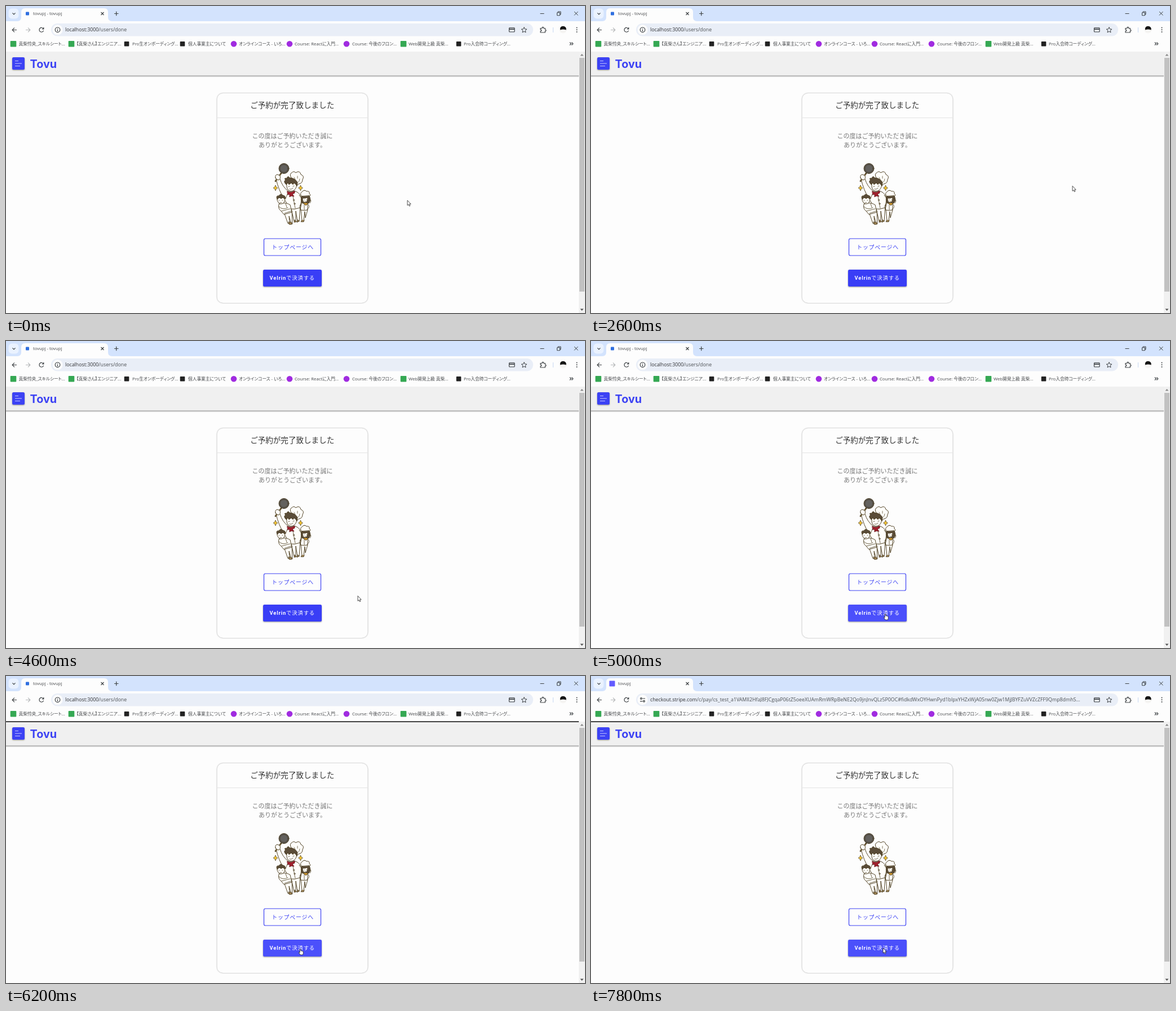
Animation, 1027 px wide and 545 px high, one loop 8 s. Source, as an HTML page:

```html
<!DOCTYPE html>
<html lang="ja">
<head>
<meta charset="utf-8">
<title>tovupj</title>
<style>
html, body { margin: 0; width: 100%; height: 100%; overflow: hidden; background: #fdfdfd; }
svg { position: absolute; left: 0; top: 0; }
.ui { font-family: "Open Sans", "Noto Sans CJK JP", sans-serif; font-feature-settings: "palt"; fill: #46484b; }
.ja { font-family: "Noto Sans CJK JP", sans-serif; font-weight: 300; text-anchor: middle; }
.btn { font-family: Roboto, "Noto Sans CJK JP", sans-serif; letter-spacing: .84px; }
.icon { fill: none; stroke: #3c4043; stroke-width: 1.2; }
.art { stroke: #4a3b1e; stroke-width: .95; fill: #fffefa; stroke-linejoin: round; stroke-linecap: round; }
.hair { fill: #5a4c38; }
.line { fill: none; }
#url { position: absolute; left: 105px; top: 34px; width: 790px; height: 17px; line-height: 17px;
  font-size: 8.8px; color: #4c5054; white-space: nowrap; overflow: hidden; }
#url b { font-weight: 400; color: #303134; }
</style>
</head>
<body>
<svg width="1027" height="545" viewBox="0 0 1027 545">
  <defs>
    <clipPath id="btnClip"><rect x="456" y="468" width="104" height="30" rx="2.500"/></clipPath>
    <clipPath id="faceClip"><circle cx="988" cy="42" r="6.500"/></clipPath>
    <clipPath id="pageClip"><rect y="81" width="1016" height="464"/></clipPath>
    <path id="star4" d="M0-5Q.7-.8 4 0Q.7.8 0 5Q-.7.8-4 0Q-.7-.8 0-5Z" fill="#f2c230" stroke="#4a3a18" stroke-width=".7"/>
  </defs>

  <!-- browser window -->
  <rect width="1027" height="34" fill="#d3e3fd"/>
  <rect y="27" width="1027" height="54" fill="#fdfdfd"/>
  <path d="M20 27Q27 27 27 20V11Q27 4 34 4H174Q181 4 181 11V20Q181 27 188 27Z" fill="#fdfdfd"/>
  <rect x="4.500" y="4.500" width="18" height="18" rx="6" fill="#eaf2ff"/>
  <g class="icon">
    <path d="M11.500 12.300L14 14.800L16.500 12.300"/>
    <path d="M168.500 11L173.500 16M173.500 11L168.500 16"/>
    <path d="M192 13.500H199.500M195.700 9.700V17.300"/>
    <path d="M947.500 13.500H954.500M977.500 11.800H982.500V16.800H977.500ZM979 11.500V10H984V15H982.800M1008 10L1014.500 16.500M1014.500 10L1008 16.500" stroke-width="1"/>
    <path d="M19 42.500H11.500M15 38.700L11.200 42.500L15 46.300"/>
    <path d="M35 42.500H42.500M39 38.700L42.800 42.500L39 46.300" stroke="#b4b6b8"/>
    <path d="M66.300 40.400A3.900 3.900 0 1 0 66.600 43.600M66.800 38V41H63.800"/>
  </g>
  <rect x="80" y="31" width="855" height="22.500" rx="11.200" fill="#e9eef7"/>
  <circle cx="91.500" cy="42.300" r="9" fill="#fdfdfd"/>
  <g id="info" class="icon"><circle cx="91.500" cy="42.300" r="4.300"/><path d="M91.500 41.700V45M91.500 39.700V40.800"/></g>
  <g id="tune" class="icon"><circle cx="89" cy="40" r="1.400"/><circle cx="94" cy="44.800" r="1.400"/><path d="M91.500 40H96M87 44.800H91.500"/></g>
  <g class="icon">
    <rect x="892.500" y="38.500" width="9.500" height="7.500" rx="1"/><path d="M892.500 41H902" stroke-width="1.800"/>
    <path d="M919 37.600L920.400 40.900L923.900 41.200L921.200 43.500L922 47L919 45.100L916 47L916.800 43.500L914.100 41.200L917.600 40.900Z" stroke-width="1"/>
    <path d="M948 39.500H951Q951 37.300 952.300 37.300Q953.600 37.300 953.600 39.500H956.300V42Q958 42 958 43.300Q958 44.600 956.300 44.600V47H948V44.800Q949.900 44.600 949.900 43.300Q949.900 42 948 41.900Z"/>
    <path d="M970.500 38V47" stroke="#cfdcf3"/>
  </g>
  <g clip-path="url(#faceClip)"><rect x="980" y="34" width="16" height="16" fill="#f6f5f3"/><path d="M983 42.500Q982 36 988 35.500Q994.500 36 993.500 42.500Q988 40.500 983 42.500Z" fill="#151515"/></g>
  <g fill="#3c4043"><circle cx="1012.500" cy="38.500" r="1"/><circle cx="1012.500" cy="42.200" r="1"/><circle cx="1012.500" cy="45.900" r="1"/></g>
  <rect id="fav" y="9" height="9" rx="1"/>
  <text id="tab" class="ui" x="48" y="16.400" font-size="7.700"></text>
  <g id="marks" class="ui" font-size="7.700"></g>
  <path class="icon" d="M1000 64.500L1002.500 67L1000 69.500M1003.300 64.500L1005.800 67L1003.300 69.500"/>

  <!-- page -->
  <g clip-path="url(#pageClip)">
    <rect y="81" width="1016" height="464" fill="#fdfdfd"/>
    <rect x="-5" y="81" width="1026" height="42.500" fill="#f0f0f0" style="filter:drop-shadow(0 1px 1.300px #0008)"/>
  </g>
  <rect id="bar" y="80.300" width="1016" height="1.700" fill="#222"/>
  <rect x="11" y="91" width="22" height="22" rx="2.500" fill="#3c42f4" style="filter:drop-shadow(0 1px 1px #0006)"/>
  <path d="M16 97.500H22M16 102H28M16 106.500H25" stroke="#c9cbff" stroke-width="1"/>
  <text x="42.500" y="110" font-family="Inter, sans-serif" font-size="19.800" font-weight="700" fill="#3c42f4">Tovu</text>

  <rect x="374.500" y="155" width="267" height="372" rx="10.500" fill="#fdfdfd" style="filter:drop-shadow(0 .8px .9px #0006)"/>
  <path d="M374.500 198.500H641.500" stroke="#e4e4e4"/>
  <g class="ja">
    <text x="507.700" y="181.200" font-size="13.550" fill="#333">ご予約が完了致しました</text>
    <g font-size="11" fill="#777">
      <text x="508" y="234.500">この度はご予約いただき誠に</text>
      <text x="508" y="250.700">ありがとうございます。</text>
    </g>
  </g>

  <g class="art">
    <!-- tall chef -->
    <path d="M505 356L511 382L514 383L514 364L517 382L520 382L522 355Z"/>
    <path d="M479 307Q483 326 494 344Q500 351 502 360Q512 362 522 358L524 343Q523 333 514 329H501Q490 321 486 307Z"/>
    <path class="line" d="M496 342L499 334M520 336Q527 342 524 350M509 338L513 359" stroke-width=".8"/>
    <path d="M506 305Q502 298 507 296Q510 292 514 296Q521 291 523 299Q530 302 526 308Q526 315 519 316L515 319L504 309Z"/>
    <path class="line" d="M511 304L513 308M517 302V306M518 313Q521 311 521 307" stroke-width=".7"/>
    <path d="M498 313Q497 322 500 326Q505 331 511 327Q516 323 516 314Q507 308 498 313Z"/>
    <path class="hair" d="M497 317Q491 311 496 309Q492 305 498 306Q500 300 503 305Q512 305 517 313L516 320Q514 316 511 314L509 317L506 314L502 317L500 314Z"/>
    <path class="line" d="M501 320.500L503 320M509 320L511 319.500M503 325Q507 326 509 323" stroke-width=".8"/>
    <path d="M499 329Q505 333 512 328L512 332L508 334L511 338L506 337L503 339L503 334L500 335Z" fill="#a3202c" stroke="#63141b"/>
    <g class="line" stroke-width=".7"><circle cx="510.500" cy="344.500" r="1.200"/><circle cx="512" cy="351" r="1.200"/></g>
    <path d="M512 380L511 384L515 383ZM517 380L516 384L520 382Z" fill="#a28656"/>
    <!-- pan -->
    <path d="M488 297L478 311" stroke="#4c3b1d" stroke-width="2.600"/>
    <path d="M487 299L479 310" stroke="#a89256" stroke-width="1"/>
    <circle cx="493" cy="288.500" r="9" fill="#555350"/><circle cx="493" cy="288.500" r="6.800" fill="#63615e" stroke-width=".5"/>
    <path d="M478 305Q477 300 481 299L486 301Q488 306 484 309Q480 309 478 305Z"/>
    <!-- left chef -->
    <path d="M493 366L500 386L503 387L502 373L506 386H508L507 363Z"/>
    <path d="M484 352Q482 360 488 364L493 370L507 366L504 353Q498 349 490 350Z"/>
    <path class="line" d="M484 356Q490 363 500 358M489 364L504 360M496 351L498 357M494 368L506 364" stroke-width=".8"/>
    <path d="M481 341Q480 346 484 350Q489 353 493 349Q496 345 494 340Z"/>
    <path class="hair" d="M481 343Q478 336 484 337Q487 332 491 336Q497 337 495 343L491 340L488 342L485 340Z"/>
    <path class="line" d="M484 345H485M490 345H491M486 349H489" stroke-width=".8"/>
    <path d="M501 384L503 388L508 387L506 384Z" fill="#a28656"/>
    <!-- right chef -->
    <path d="M523 360L525 381L528 381L530 365L531 376L535 362Z"/>
    <path d="M524 350L522 362Q529 364 535 362V350Z"/>
    <path class="line" d="M535 351Q541 357 534 361M524 351Q518 355 523 361M539 350Q543 345 539 343M529 352V362" stroke-width=".8"/>
    <path d="M525 338Q520 333 525 330Q529 325 533 329Q539 328 538 333Q542 336 537 339Z"/>
    <path class="hair" d="M524 338Q522 347 526 350H537Q542 345 538 337Z"/>
    <path d="M526 341Q526 349 531 349Q535 348 535 340Q530 342 526 341Z"/>
    <path class="line" d="M529 344H529.500M533 344H533.500M530 347H532" stroke-width=".8"/>
    <path d="M527 350L532 354L536 350" fill="#d39a2e"/>
    <path d="M525 380L523 383H528L529 380" fill="#a28656"/>
  </g>
  <use href="#star4" x="478" y="323"/><use href="#star4" x="522.500" y="323"/>

  <rect x="457.500" y="413" width="101" height="30" rx="2.500" fill="#fdfdfd" stroke="#3c42f4" stroke-width="1.200"/>
  <text class="ja btn" x="508.600" y="431.500" font-size="9.900" style="font-weight:500" fill="#3c42f4">トップページへ</text>
  <rect id="pay" x="456" y="468" width="104" height="30" rx="2.500"/>
  <g clip-path="url(#btnClip)"><circle id="ripple" cy="483" fill="#fff"/></g>
  <text class="btn" x="467.500" y="486.200" font-size="9.360" fill="#fff"><tspan font-weight="700">Velrin</tspan><tspan font-weight="400">で決済する</tspan></text>

  <!-- scrollbar -->
  <rect x="1016" y="81" width="11" height="464" fill="#f1f1f1"/>
  <rect x="1017" y="92" width="9" height="415" fill="#c1c1c1"/>
  <path d="M1018.500 88.500L1021.500 85L1024.500 88.500Z" fill="#8a8a8a"/><path d="M1018.500 537.500L1021.500 541L1024.500 537.500Z" fill="#555"/>

  <g id="cursor" fill="#fff" stroke="#222" stroke-width=".8" stroke-linejoin="round">
    <path id="arrow" d="M0 0V9L2 7.300L3.400 10.300L4.900 9.600L3.500 6.600H6.200Z"/>
    <path id="hand" d="M-.8 5.500V1Q0-.5.9 1V4Q2 3.300 2.500 4.300Q3.500 3.700 4 4.700Q5.200 4.400 5.200 5.700V8.500Q5 10 4.200 11H.2L-2.700 7Q-2.700 5.500-.8 7Z"/>
  </g>
</svg>
<div id="url" class="ui"></div>

<script>
const $ = id => document.getElementById(id);
const show = (id, on) => $(id).style.display = on ? "" : "none";

const GREEN = "#35a853", BLACK = "#222", PURPLE = "#a02be0";
const bookmarks = [
  [13, 22.5, GREEN, "真柴怜央_スキルシート..."],
  [116, 125, GREEN, "【真柴さん】エンジニア..."],
  [214, 224, BLACK, "Pro生オンボーディング..."],
  [313, 323, BLACK, "個人事業主について"],
  [404, 413, PURPLE, "オンラインコース - いろ..."],
  [503, 512, PURPLE, "Course: Reactに入門..."],
  [604, 614, PURPLE, "Course: 今後のフロン..."],
  [705, 714, GREEN, "Web開発上級 真柴..."],
  [803, 812, BLACK, "Pro入会時コーディング..."]
];
$("marks").innerHTML = bookmarks.map(([x, textX, color, label]) => {
  const r = color === BLACK ? 4.3 : 5.3;
  return `<rect x="${x - r}" y="${67.3 - r}" width="${2 * r}" height="${2 * r}" rx="${color === PURPLE ? r : 1}" fill="${color}"/>
    <text x="${textX}" y="70.3">${label}</text>`;
}).join("");

const pages = [
  { tab: "tovupj - tovupj", icon: [35, 6, "#2f6fe0"], url: "<b>localhost:3000</b>/users/done" },
  { tab: "tovupj", icon: [32.5, 10, "#635bff"], url: "<b>checkout.stripe.com</b>/c/pay/cs_test_a1VAMlI2HfaJ8FJCgqaP06tZ5oeeXUAmRmWRpBeNE2Qo9jnJnvQLz5P0OC#fidkdWxOYHwnPyd1blpxYHZxWjA0Snw0Zjw1MjJBYFZuVVZcZFF9Qmp8dmhS..." }
];

// pointer path: time, x, y
const path = [[0, 712, 345], [1200, 956, 231], [2200, 956, 231], [3000, 752, 408], [3200, 752, 408],
  [3600, 726, 421], [4200, 726, 421], [5000, 522, 484], [7000, 522, 484], [7200, 518, 483], [8000, 518, 483]];

function pointer(t) {
  const i = path.findIndex(k => k[0] > t);
  const [t0, x0, y0] = path[i - 1], [t1, x1, y1] = path[i];
  const p = (t - t0) / (t1 - t0), e = p * p * (3 - 2 * p);
  return [x0 + (x1 - x0) * e, y0 + (y1 - y0) * e];
}

// click wave: centre, radius, opacity
const waves = { 5600: [515, 24, .2], 5800: [509.5, 48, .35], 6000: [508, 56, .15] };

function setPage({ tab, icon: [x, size, color], url }) {
  $("tab").textContent = tab;
  $("fav").setAttribute("x", x);
  $("fav").setAttribute("y", 13.5 - size / 2);
  $("fav").setAttribute("width", size);
  $("fav").setAttribute("height", size);
  $("fav").setAttribute("fill", color);
  $("url").innerHTML = url;
}

let current;
function draw(now) {
  const t = Math.floor(now % 8000 / 200) * 200;
  const [x, y] = pointer(t);
  const over = x > 456 && x < 560 && y > 468 && y < 498;
  const loaded = t >= 7200;

  $("cursor").setAttribute("transform", `translate(${x} ${y})`);
  show("hand", over && !loaded);
  show("arrow", !over || loaded);
  $("pay").setAttribute("fill", over ? "#4b50fb" : "#393ef6");
  const pressed = t === 5600 || t === 5800;
  $("pay").style.filter = pressed ? "drop-shadow(0 2px 2.5px #0008)" : "drop-shadow(0 1px 1px #0006)";

  const [cx, r, opacity] = waves[t] || [508, 0, 0];
  $("ripple").setAttribute("cx", cx);
  $("ripple").setAttribute("r", r);
  $("ripple").setAttribute("opacity", opacity);

  show("bar", t >= 6200);
  show("info", !loaded);
  show("tune", loaded);
  if (current !== loaded) {
    current = loaded;
    setPage(pages[+loaded]);
  }
  requestAnimationFrame(draw);
}
draw(0);
</script>
</body>
</html>
```
